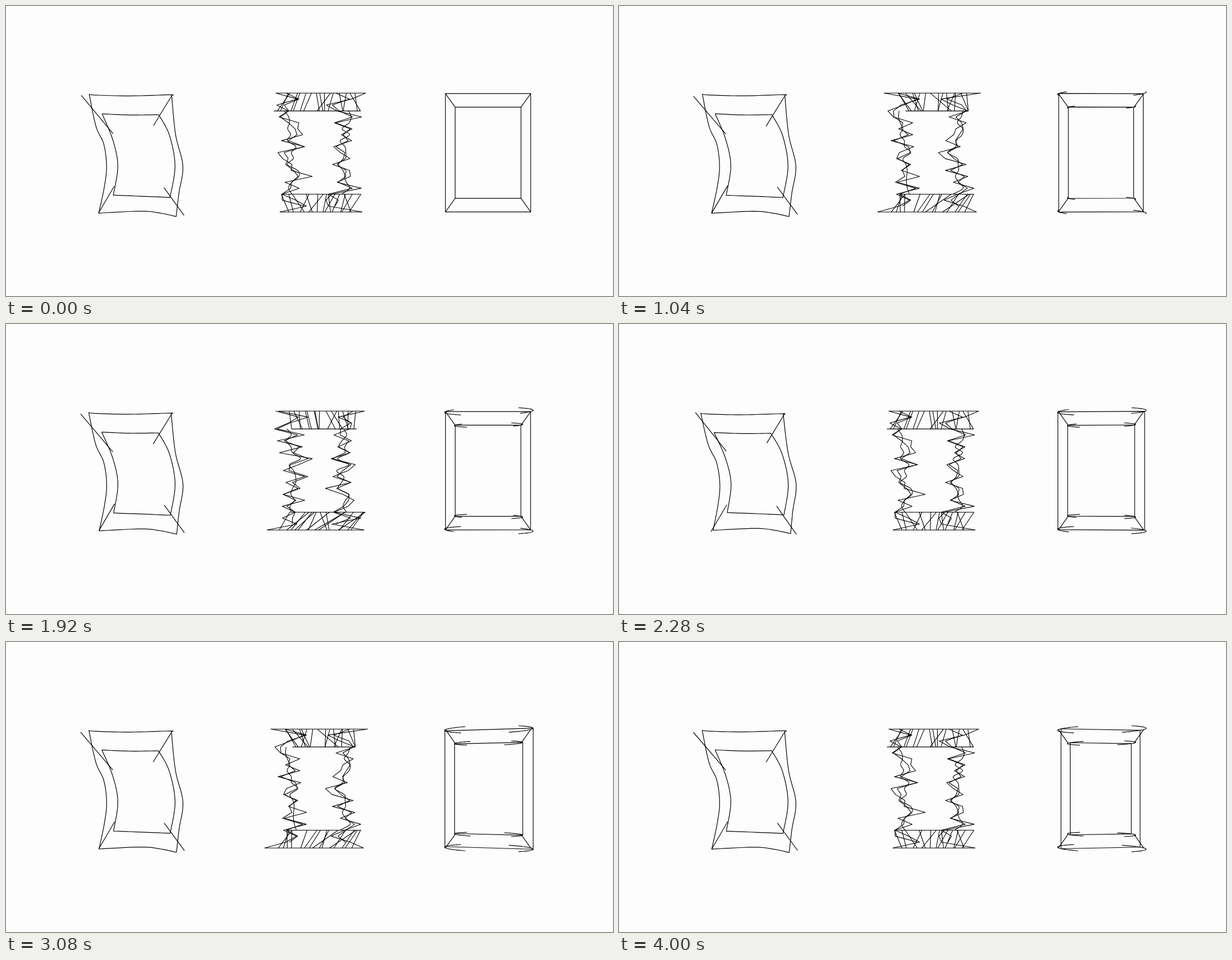
An HTML page with a canvas for the animation above (4.04 s loop, 1082 by 517 pixels).

```html
<!DOCTYPE html>
<html lang="en">
<head>
<meta charset="utf-8">
<title>Three frames</title>
<style>
  html, body { margin: 0; width: 100%; height: 100%; overflow: hidden; background: #fdfdfd; }
  canvas { display: block; }
</style>
</head>
<body>
<canvas id="stage" width="1082" height="517"></canvas>
<script>
const ctx = document.getElementById('stage').getContext('2d');
const LOOP = 4040, STEP = 40;
const mix = (a, b, u) => a + (b - a) * u;

// Eases between turning points given as [time, value].
function track(keys) {
  return t => {
    let i = 0;
    while (i < keys.length - 2 && t > keys[i + 1][0]) i++;
    const [t0, v0] = keys[i], [t1, v1] = keys[i + 1];
    const u = Math.min(1, (t - t0) / (t1 - t0));
    return mix(v0, v1, u * u * (3 - 2 * u));
  };
}

function random(seed) {
  return () => {
    seed = (seed * 1664525 + 1013904223) >>> 0;
    return seed / 4294967296;
  };
}

function polyline(points) {
  ctx.beginPath();
  points.forEach(([x, y]) => ctx.lineTo(x, y));
  ctx.stroke();
}

// Catmull-Rom curve through the points.
function spline(points) {
  const at = i => points[Math.max(0, Math.min(points.length - 1, i))];
  const out = [];
  for (let i = 0; i < points.length - 1; i++) {
    const near = [at(i - 1), at(i), at(i + 1), at(i + 2)];
    for (let u = 0; u < 1; u += 0.125) {
      out.push([0, 1].map(k => {
        const [a, b, c, d] = near.map(p => p[k]);
        return b + u * (c - a + u * (2 * a - 5 * b + 4 * c - d + u * (3 * (b - c) + d - a))) / 2;
      }));
    }
  }
  return [...out, at(points.length)];
}

// Left: bent frame with loose mitre lines
const outerSides = [
  [[148, 157], [160, 158.5], [220, 160], [292, 158], [295, 159]],
  [[295, 159], [302, 229], [315, 285], [308, 333], [303, 375]],
  [[303, 375], [275, 369], [240, 365.5], [165, 369]],
  [[165, 369], [175, 322], [179, 285], [174, 246], [160, 214], [148, 157]]
];
const innerSides = [
  [[171, 192], [220, 194], [272, 193.5]],
  [[272, 193.5], [291, 230], [301, 285], [292, 341]],
  [[292, 341], [245, 339], [191, 337]],
  [[191, 337], [199, 285], [190, 238], [171, 192]]
];
const outlines = [outerSides, innerSides].map(sides => sides.flatMap(spline));
const sway = track([[0, 0], [600, 0.15], [1520, -0.4], [2280, 1], [2680, -0.3], [3480, 0.7], [4040, 0]]);
const drift = track([[0, 0], [250, 1], [600, 0.5], [900, 1.1], [1520, -0.5], [1950, 0.7],
  [2280, -1], [2850, 1.1], [3480, 0], [3800, 0], [4000, 1]]);

function drawBent(t) {
  const s = sway(t), d = drift(t);
  ctx.lineWidth = 1.2;
  for (const outline of outlines) {
    polyline(outline.map(([x, y]) => {
      const v = (y - 266) / 109;
      return [x + 2.6 * s * v, y - 1.6 * s * v];
    }));
  }
  polyline([[134 - 1.8 * d, 159 + 1.7 * d], [190.5 - 0.5 * d, 227.3 + 0.7 * d]]);
  polyline([[295 - 0.5 * d, 160 + d], [262.5 - 0.6 * d, 213 + 0.9 * d]]);
  polyline([[164.5 + d, 369 - d], [192.7 + 0.8 * d, 321 - d]]);
  polyline([[281.3 + 0.7 * d, 323.3 - d], [317 + d, 373 - 1.8 * d]]);
}

// Middle: torn frame that takes four random poses, half a second each
const ROW = 10.6, TOP = 155, ROWS = 20, BAR = 3;
const rowY = i => TOP + i * ROW;

function buildPose(seed) {
  const rnd = random(seed * 977 + 31), spread = n => (rnd() - 0.5) * 2 * n;
  const rail = (left, right, row) => {
    const a = left + spread(18), b = right + spread(7);
    return [[a, rowY(row)], [b, rowY(row)]];
  };
  const rails = [rail(476, 638, 0), rail(495, 625, BAR), rail(502, 635, ROWS - BAR), rail(476, 640, ROWS)];
  const lines = [...rails];

  for (const side of [0, 1]) {
    const center = side ? 602 : 509, outward = side ? 1 : -1;
    let zig = 1;
    const wander = Array.from({ length: ROWS + 1 }, (_, i) => {
      const flare = 16 * Math.abs(i / ROWS - 0.45) - 4;
      return [center + outward * flare + spread(13), rowY(i)];
    });
    const jagged = wander.map(([x, y]) => {
      if (rnd() < 0.8) zig = -zig;
      return [x + zig * mix(6, 24, rnd()), y];
    });
    const echo = jagged.map(([x, y], i) => [mix(wander[i][0], x, rnd()) + spread(7), y]);
    jagged[0] = rails[0][side];
    jagged[ROWS] = rails[3][side];
    lines.push(jagged, echo.slice(0, -1), spline(wander.slice(BAR, ROWS - BAR + 1)));
  }

  const hatch = ([a, b], [c, d]) => {
    for (let i = 0; i < 15; i++) {
      const u = (i + rnd()) / 15;
      const v = Math.max(0, Math.min(1, u + spread(rnd() < 0.5 ? 0.07 : 0.26)));
      lines.push([[mix(a[0], b[0], mix(0.1, 0.9, u)), a[1]], [mix(c[0], d[0], v), c[1]]]);
    }
  };
  hatch(rails[0], rails[1]);
  hatch(rails[3], rails[2]);
  return lines;
}
const poses = [1, 2, 3, 4].map(buildPose);

function drawTorn(t) {
  ctx.lineWidth = 1.1;
  poses[Math.floor(t / 500) % poses.length].forEach(polyline);
}

// Right: frame turning in perspective, corners leaving a trace
const turns = [[0, 0], [180, 21], [420, -26], [876, 29], [1120, -12], [1580, 65],
  [2120, -30], [2510, 63], [2800, -45], [3300, 65], [3900, -20], [4230, 20]];
const turn = track(turns);
const EYE = 1150, VANISH_X = 541, CENTER_X = 859, CENTER_Y = 261.3;
const shapes = [[76, 105.5], [58.7, 81.3]];
const corners = [[-1, -1], [1, -1], [1, 1], [-1, 1]];

function project([side, level], [halfWidth, halfHeight], degrees) {
  const a = degrees * Math.PI / 180;
  const scale = EYE / (EYE - side * halfWidth * Math.sin(a));
  return [
    VANISH_X + (CENTER_X - VANISH_X + side * halfWidth * Math.cos(a)) * scale,
    CENTER_Y + level * halfHeight * scale
  ];
}

function drawTurning(t) {
  const now = turn(t);
  const seen = turns.filter(([time]) => time <= t).map(([, angle]) => angle).concat(now);
  const low = Math.min(...seen), high = Math.max(...seen);
  ctx.lineWidth = 1.15;
  for (const size of shapes) {
    const loop = corners.map(corner => project(corner, size, now));
    polyline([...loop, loop[0]]);
    for (const corner of corners) {
      polyline(Array.from({ length: 41 }, (_, i) => project(corner, size, mix(low, high, i / 40))));
    }
  }
  for (const corner of corners) polyline(shapes.map(size => project(corner, size, 0)));
}

function draw(time) {
  const t = Math.floor((time % LOOP) / STEP) * STEP;
  ctx.fillStyle = '#fdfdfd';
  ctx.fillRect(0, 0, 1082, 517);
  ctx.strokeStyle = '#000';
  ctx.lineJoin = 'round';
  ctx.save();
  ctx.translate(0.3, 0.3);
  drawBent(t);
  drawTorn(t);
  drawTurning(t);
  ctx.restore();
}

let start;
function tick(now) {
  start ??= now;
  draw(now - start);
  requestAnimationFrame(tick);
}
draw(0);
requestAnimationFrame(tick);
</script>
</body>
</html>
```
